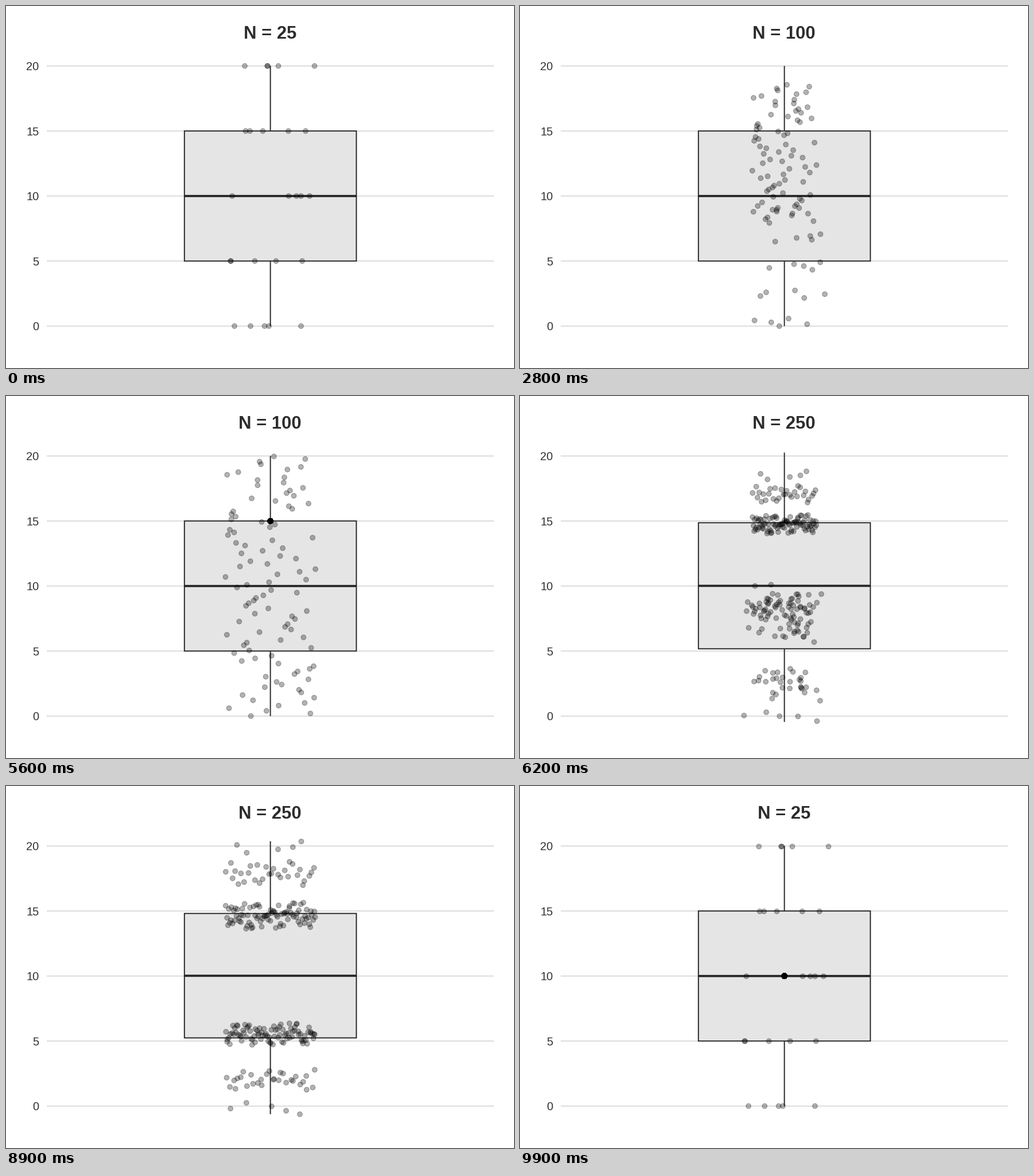
A matplotlib script that plays this animation: 885 by 632 pixels, repeating every 10 s.

```python
import numpy as np
import matplotlib.pyplot as plt
from matplotlib.animation import FuncAnimation
from matplotlib.patches import Rectangle

W, H, DPI = 885, 632, 64
PT = 72 / DPI                  # points per pixel
FRAMES, STEPS = 100, 12
MID_X, BOX_L, BOX_R = 460.6, 310.8, 610.4
JITTER = 79                    # half width of the point cloud
INK = "#242426"

rng = np.random.default_rng(12)


def level(v):
    """Data value to pixel row."""
    return 558.8 - 22.705 * np.asarray(v, float)


def jitter(n):
    """Evenly filled but shuffled x positions."""
    u = rng.permutation((np.arange(n) + rng.random(n)) / n)
    return MID_X + JITTER * (2 * u - 1)


def bell(n, lo, hi):
    """Shuffled values from lo to hi, denser in the middle."""
    u = np.linspace(-1, 1, n)
    u = np.sign(u) * np.abs(u) ** 1.35
    return rng.permutation((lo + hi) / 2 + (hi - lo) / 2 * u)


def cloud(x, values):
    return np.column_stack([x, level(values)])


# N = 25: five points on each of five levels
x25 = [514, 426, 398, 458, 450.5,
       433.5, 391, 516, 470.5, 392,
       506, 394, 529, 492.5, 514,
       425, 522, 417.5, 447.5, 492,
       474.5, 537.5, 455, 416, 456]
small = cloud(x25, np.repeat([0, 5, 10, 15, 20], 5))

# N = 100: evenly spaced values
medium = cloud(jitter(100), np.linspace(0, 20, 100))

# N = 250: bands of (count, lowest, highest)
BANDS = [(5, -.63, .25), (30, 1.25, 2.75), (90, 4.7, 6.35),
         (90, 13.65, 15.65), (30, 17, 18.8), (5, 19.5, 20.37)]
large = np.vstack([cloud(jitter(n), bell(n, lo, hi)) for n, lo, hi in BANDS])

# lower whisker, lower hinge, median, upper hinge, upper whisker
even_box = level([0, 5, 10, 15, 20])
large_box = level([-.63, 5.245, 10.02, 14.81, 20.37])

STATES = [(small, even_box), (medium, even_box), (large, large_box)]
HOLD_END = [21, 55, 88]        # last still frame of each state
HUBS = level([15, 15, 10])     # where surplus points meet


def ease(t):
    return 4 * t ** 3 if t < .5 else 1 - 4 * (1 - t) ** 3


def pad(pts, n, hub):
    extra = np.tile([MID_X, hub], (n - len(pts), 1))
    return np.vstack([pts, extra])


def scene(i):
    """Points, box values and sample size for one frame."""
    for s, end in enumerate(HOLD_END):
        k = i - end
        if k <= 0:
            return *STATES[s], len(STATES[s][0])
        if k < STEPS:
            (p, b), (q, c) = STATES[s], STATES[(s + 1) % 3]
            n = max(len(p), len(q))
            e = ease(k / STEPS)
            pts = (1 - e) * pad(p, n, HUBS[s]) + e * pad(q, n, HUBS[s])
            count = len(p) if k < STEPS / 2 else len(q)
            return pts, (1 - e) * b + e * c, count


fig = plt.figure(figsize=(W / DPI, H / DPI), dpi=DPI, facecolor="white")
ax = fig.add_axes([0, 0, 1, 1])
ax.set(xlim=(0, W), ylim=(H, 0))
ax.axis("off")


def line(xs, ys, width, color=INK, z=3):
    return ax.plot(xs, ys, color=color, lw=width * PT, zorder=z,
                   solid_capstyle="butt", snap=False)[0]


def label(x, y, text, size, color, **style):
    return ax.text(x, y, text, size=size * PT, color=color, va="baseline",
                   family="Liberation Sans", **style)


for v in range(0, 21, 5):
    y = float(level(v))
    line([71, 850], [y, y], 1.3, "#cccccc", 1)
    label(57.3, y + 7.4, str(v), 20, "#333335", ha="right")

title = label(460.2, 57, "", 31, "#2d2d2f", ha="center", weight="bold")

lower = line([], [], 1.9)
upper = line([], [], 1.9)
box = ax.add_patch(Rectangle((BOX_L, 0), BOX_R - BOX_L, 1, fc="#e5e5e5", ec=INK,
                             lw=1.9 * PT, zorder=4, snap=False))
median = line([], [], 3.8, z=5)
dots = ax.scatter([0, 0], [0, 0], s=(8.7 * PT) ** 2, zorder=6,
                  facecolors=[(0, 0, 0, .3)], edgecolors=[(0, 0, 0, .3)])
dots.set_linewidth([1.1 * PT, 1.1 * PT])   # two widths keep sub-pixel positions
dots.set_snap(False)


def draw(i):
    pts, (w0, q1, med, q3, w1), count = scene(i)
    dots.set_offsets(pts)
    lower.set_data([MID_X, MID_X], [w0, q1])
    upper.set_data([MID_X, MID_X], [q3, w1])
    box.set_y(q3)
    box.set_height(q1 - q3)
    median.set_data([BOX_L, BOX_R], [med, med])
    title.set_text(f"N = {count}")
    return dots, lower, upper, box, median, title


anim = FuncAnimation(fig, draw, frames=FRAMES, interval=100,
                     init_func=lambda: draw(0), repeat=True, repeat_delay=0)
plt.show()
```
